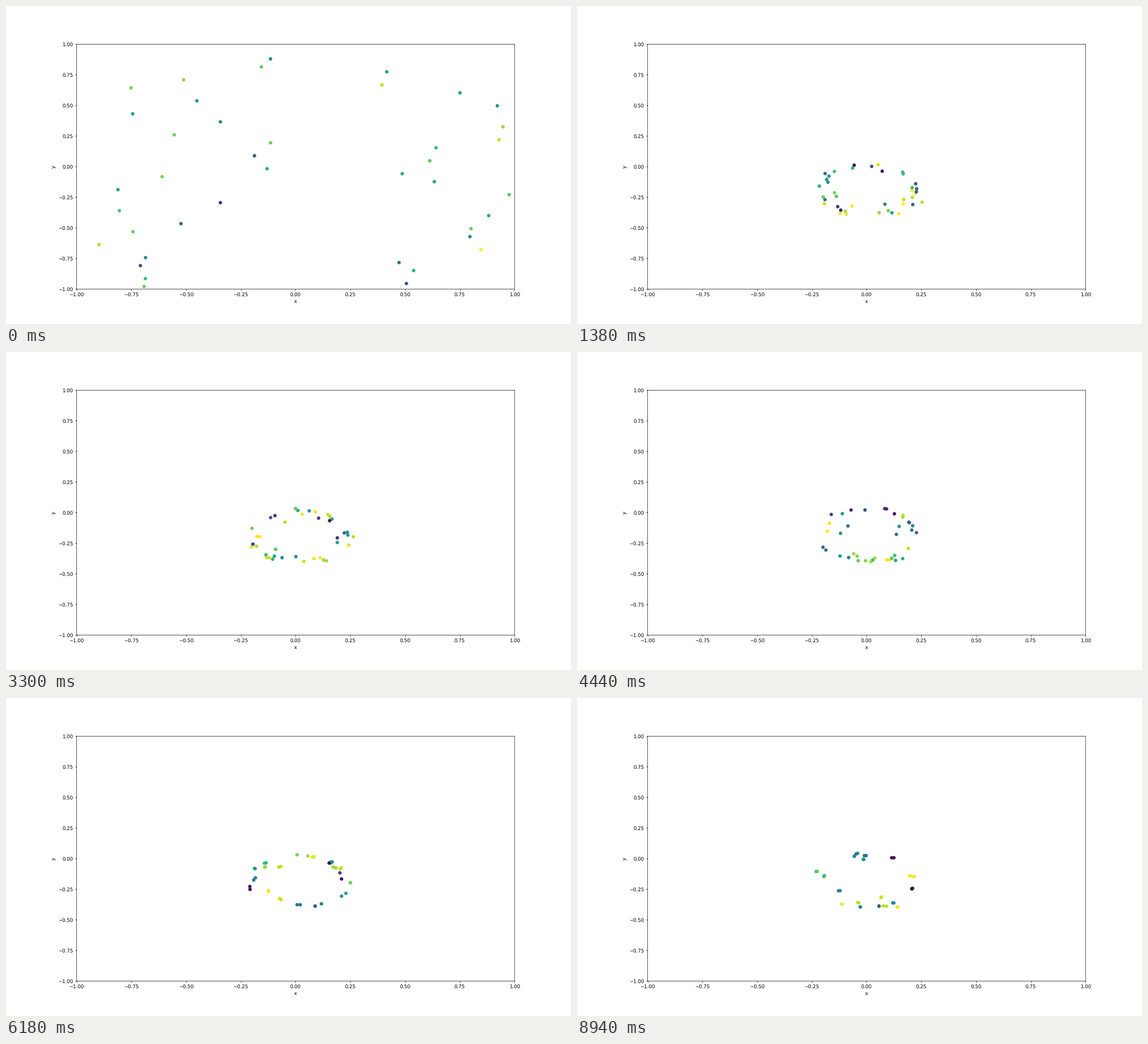
Animation, 998 px wide and 561 px high, one loop 9 s. Source, as a matplotlib script:

```python
import numpy as np
import matplotlib.pyplot as plt
from matplotlib.animation import FuncAnimation

W, H, DPI = 998, 561, 62.5
FRAMES, STEP = 150, 60
N, LEFT, GROUPS = 40, 22, 19
CENTER = np.array([0.01, -0.19])
FALL = 1.02      # seconds until every dot has reached the ring
GOLDEN = 0.618034

plt.rcParams["text.hinting"] = "none"
rng = np.random.default_rng(12)
index = np.arange(N)
group = index % GROUPS


def smooth(x):
    x = np.clip(x, 0, 1)
    return x * x * (3 - 2 * x)


def per_group(values):
    return values[group]


# Scattered start: a loose crowd on each side with a gap between them.
start = np.c_[
    np.where(index < LEFT, rng.uniform(-0.9, -0.07, N), rng.uniform(0.35, 1, N)),
    1.9 * (index * GOLDEN % 1) - 0.98,
]
start_tone = np.clip(rng.normal(0.62, 0.22, N), 0, 1)

# Each group shares one tilted ellipse; its members close up over time.
slot = np.arange(GROUPS)
phase = per_group(slot * GOLDEN * 2 * np.pi)
rate = per_group(np.where(slot % 2, 1, -1) * rng.uniform(0.95, 1.15, GROUPS))
major = per_group(rng.uniform(0.2, 0.25, GROUPS))
minor = major * per_group(0.4 + 0.6 * rng.beta(3, 1, GROUPS))
tilt = per_group(rng.uniform(0, np.pi, GROUPS))
tone_rate = per_group(rng.uniform(0.5, 1.1, GROUPS))
tone_phase = per_group(slot * GOLDEN)

merge = rng.uniform(2.2, 9, N)
lead = rng.uniform(-1.3, 1.3, N)
swell = rng.uniform(-0.12, 0.08, N)
gap = rng.normal(0, 1, (N, 2)) * [0.004, 0.002]


def orbit(t):
    """Positions and colour values while circling the centre."""
    apart = 1 - smooth(t / merge)
    ang = phase + 2 * np.pi * rate * t + lead * apart
    size = 1 + swell * apart
    u, v = size * major * np.cos(ang), size * minor * np.sin(ang)
    x = u * np.cos(tilt) - v * np.sin(tilt)
    y = u * np.sin(tilt) + v * np.cos(tilt)
    wave = np.abs(2 * ((tone_phase + tone_rate * t + 0.2 * lead * apart) % 1) - 1)
    return CENTER + np.c_[x, y] + gap, 1 - wave ** 1.7


home = orbit(0)[0]


def state(t):
    pos, tone = orbit(t)
    fall = max(0, 1 - t / FALL) ** 1.5
    return pos + fall * (start - home), tone + fall * (start_tone - tone)


fig, ax = plt.subplots(figsize=(W / DPI, H / DPI), dpi=DPI)
ax.set(xlim=(-1, 1), ylim=(-1, 1), xlabel="x", ylabel="y")
for line in [*ax.spines.values(), *ax.get_xticklines(), *ax.get_yticklines()]:
    line.set_snap(False)
dots = ax.scatter(*start.T, c=start_tone, cmap="viridis", vmin=0, vmax=1)


def update(i):
    pos, tone = state(i * STEP / 1000)
    dots.set_offsets(pos)
    dots.set_array(tone)
    return dots,


anim = FuncAnimation(fig, update, frames=FRAMES, interval=STEP,
                     repeat=True, repeat_delay=0)
plt.show()
```
